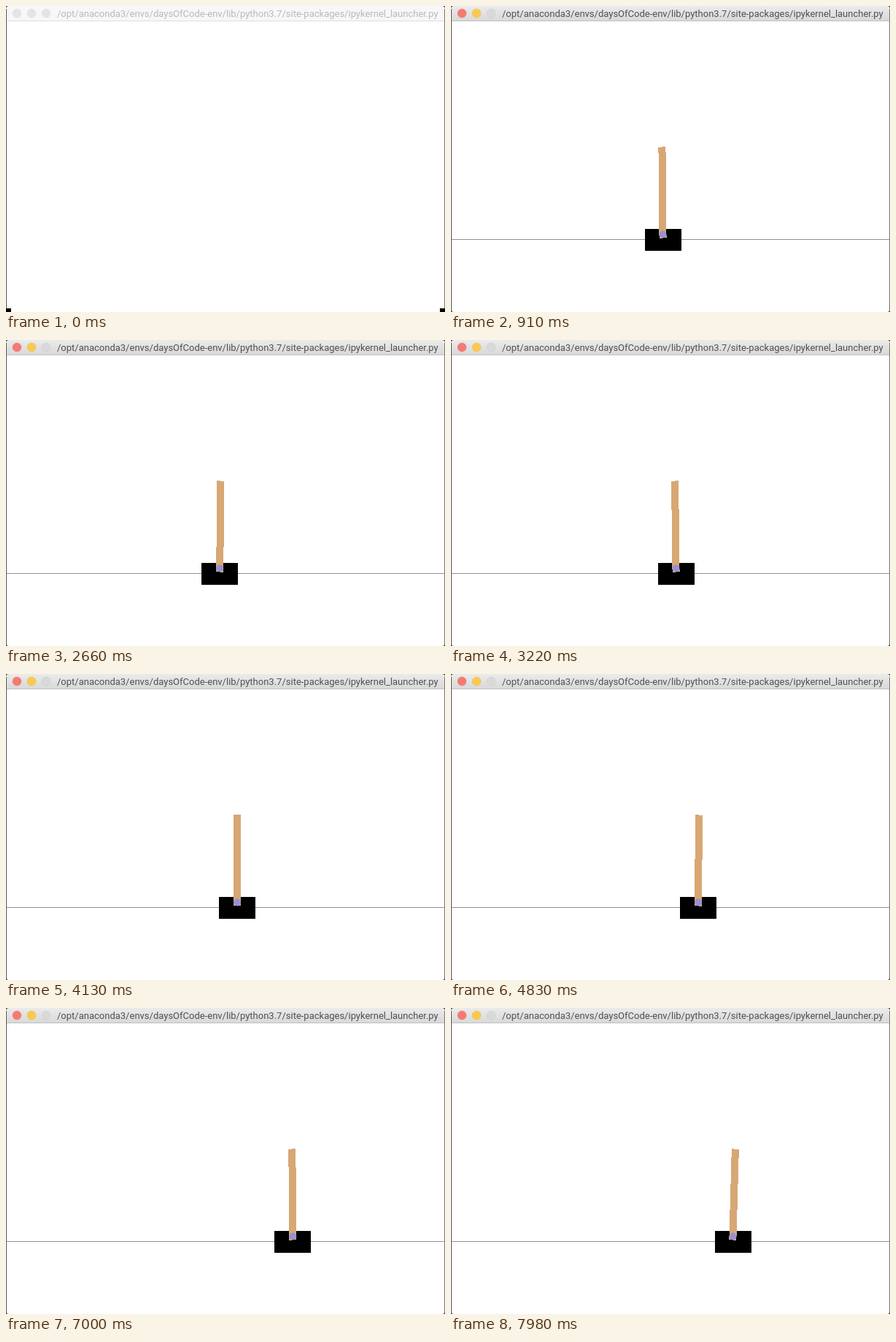
Recreate the animation shown at these times as an HTML page. Size 602 by 420 pixels, loop 8 s.

```html
<!DOCTYPE html>
<html lang="en">
<head>
<meta charset="utf-8">
<title>Cart pole</title>
<style>
  html, body { margin: 0; width: 100%; height: 100%; overflow: hidden; background: #fff; }
  svg { display: block; width: 602px; height: 420px; }
  text { font: 13px Roboto, Arial, sans-serif; fill: #505050; }
  .idle text { fill: #b9b9b9; }
  .bar { fill: url(#chrome); }
  .idle .bar { fill: #f7f7f7; }
  .rule { fill: #c0c0c0; }
  .idle .rule { fill: #dedede; }
  .light { stroke-width: .5; }
  .idle .light { fill: #e4e4e4; stroke: #e0e0e0; }
  .idle #scene, .idle .round { display: none; }
  .square { display: none; }
  .idle .square { display: inline; }
  #cart rect { shape-rendering: crispEdges; }
</style>
</head>
<body>
<svg id="stage" class="idle" viewBox="0 0 602 420">
  <defs>
    <linearGradient id="chrome" x2="0" y2="1">
      <stop stop-color="#ebebeb"/>
      <stop offset="1" stop-color="#d9d9d9"/>
    </linearGradient>
  </defs>
  <rect width="602" height="420" fill="#fff"/>
  <rect class="bar" width="602" height="20"/>
  <rect class="rule" y="20" width="602" height="1"/>

  <circle class="light" cx="15" cy="10" r="6" fill="#f57b70" stroke="#e8746a"/>
  <circle class="light" cx="35" cy="10" r="6" fill="#fac951" stroke="#e8bb4b"/>
  <circle class="light" cx="55" cy="10" r="6" fill="#d9d9d9" stroke="#c8c8c8"/>
  <text x="70" y="15">/opt/anaconda3/envs/daysOfCode-env/lib/python3.7/site-packages/ipykernel_launcher.py</text>

  <g id="scene">
    <rect y="320" width="602" height="1" fill="#909090"/>
    <g id="cart">
      <rect x="-25" y="306" width="50" height="30"/>
      <g id="pole">
        <rect x="-5" y="193.5" width="10" height="125" fill="#d7a774"/>
      </g>
      <circle cy="313.5" r="5" fill="#9891d4"/>
    </g>
  </g>

  <!-- Desktop showing around the window -->
  <path d="M.5 4V420" stroke="#55585f"/>
  <path d="M601.5 4V420" stroke="#777770"/>
  <path d="M0 0H4Q0 0 0 4ZM602 0H598Q602 0 602 4Z" fill="#333"/>
  <path class="round" d="M0 420V416Q0 420 4 420ZM602 420V416Q602 420 598 420Z" fill="#333"/>
  <path class="square" d="M0 415H7V420H0ZM595 415H602V420H595Z"/>
</svg>
<script>
const LOOP = 8000, STEP = 70, AXLE_Y = 313.5;

// Key poses; the motion between them is eased
const poses = [
  { t: 0, x: 300, tilt: 0 },
  { t: 910, x: 290.5, tilt: -0.5 },
  { t: 1960, x: 276.3, tilt: 2.2 },
  { t: 3220, x: 308.5, tilt: -0.7 },
  { t: 3900, x: 313, tilt: 0 },
  { t: 4830, x: 339, tilt: 0.5 },
  { t: 5950, x: 383.5, tilt: -0.6 },
  { t: 6720, x: 394, tilt: -0.7 },
  { t: 7980, x: 386.5, tilt: 1.6 }
];

// Harmonic mean of the neighbouring rates, level at turning points
function slope(i, part) {
  const rate = j => (poses[j + 1][part] - poses[j][part]) / (poses[j + 1].t - poses[j].t);
  const before = rate(Math.max(i - 1, 0)), after = rate(Math.min(i, poses.length - 2));
  return before * after <= 0 ? 0 : 2 * before * after / (before + after);
}

// Cubic Hermite curve through the poses
function sample(part, t) {
  const next = poses.findIndex(pose => pose.t >= t);
  const i = Math.max(next - 1, 0), a = poses[i], b = poses[i + 1];
  const span = b.t - a.t, u = (t - a.t) / span, w = 1 - u;
  return a[part] * (1 + 2 * u) * w * w + b[part] * u * u * (3 - 2 * u)
    + span * u * w * (slope(i, part) * w - slope(i + 1, part) * u);
}

const [stage, cart, pole] = ['stage', 'cart', 'pole'].map(id => document.getElementById(id));
const start = performance.now();

function draw() {
  const elapsed = (performance.now() - start) % LOOP;
  const t = Math.floor(elapsed / STEP) * STEP;
  stage.classList.toggle('idle', t < STEP);
  cart.setAttribute('transform', `translate(${sample('x', t).toFixed(2)} 0)`);
  pole.setAttribute('transform', `rotate(${sample('tilt', t).toFixed(3)} 0 ${AXLE_Y})`);
  requestAnimationFrame(draw);
}
draw();
</script>
</body>
</html>
```
